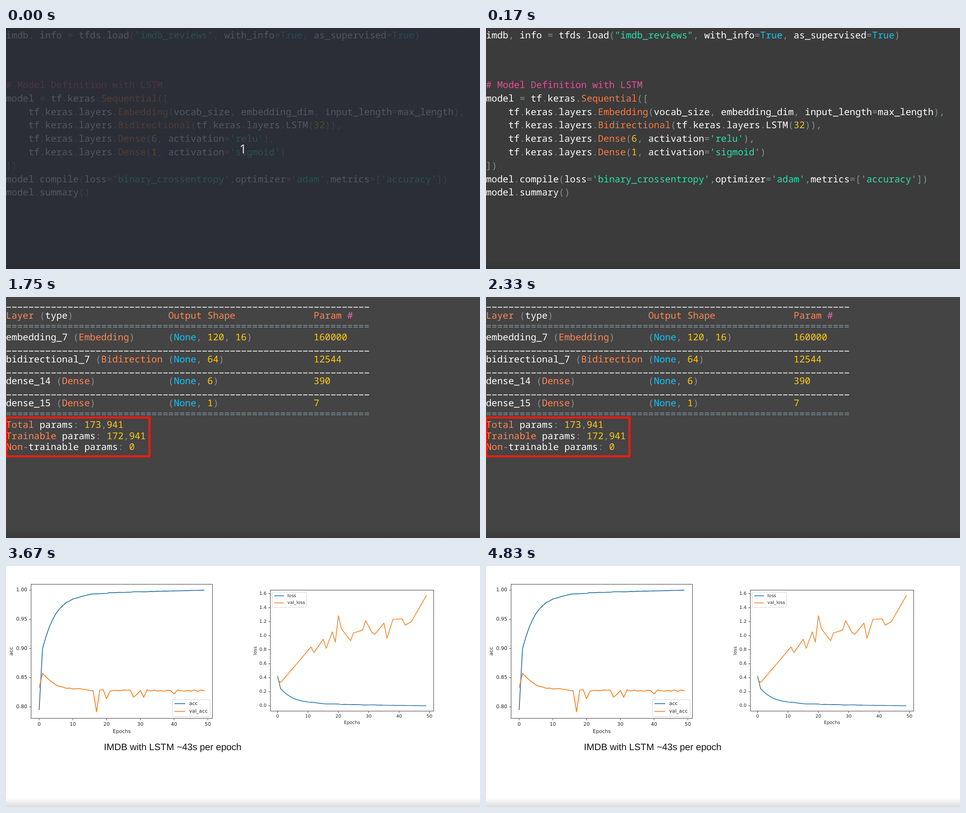
Recreate the animation shown at these times as an HTML page with a canvas. Size 1048 by 534 pixels, loop 5.33 s.

```html
<!DOCTYPE html>
<html lang="en">
<head>
<meta charset="utf-8">
<title>LSTM model, summary and training curves</title>
<style>
  html, body { margin: 0; width: 100%; height: 100%; overflow: hidden; background: #3b3b3b; }
  canvas { display: block; width: 1048px; height: 534px; }
</style>
</head>
<body>
<canvas id="stage" width="1048" height="534"></canvas>
<script>
const W = 1048, H = 534, LOOP = 5330, EPOCHS = 50;
const ctx = document.getElementById('stage').getContext('2d');
const PITCH = 12.37;
const MONO = `500 ${PITCH / 0.6}px "Roboto Mono", "Noto Sans Mono", monospace`;
const BLUE = '#3079ae', ORANGE = '#f58426', INK = '#262626', FRAME = '#484848';

const CODE_COLORS = { plain: '#ffffff', punct: '#84908f', string: '#2be0aa', comment: '#e94c9b',
  name: '#f07c48', number: '#f4c326', keyword: '#1cc3e8' };
const TABLE_COLORS = { plain: '#ffffff', punct: '#82929c', string: '#2be0aa', comment: '#f768ae',
  name: '#ff8652', number: '#ffcb0c', keyword: '#10c6f6' };

const TOKENS = [
  ['comment', /^#.*/],
  ['string', /^(["']).*?\1/],
  ['keyword', /^(True|None)\b/],
  ['name', /^(Sequential|Embedding|Bidirectional|Bidirection|Dense|Layer|Output|Shape|Param|Total|Trainable|Non)\b/],
  ['number', /^\d+\b/],
  ['plain', /^\w+/],
  ['plain', /^\s+/],
  ['punct', /^[^\w\s"'#]+/]
];

const CODE = [
  '# Model Definition with LSTM',
  'model = tf.keras.Sequential([',
  '    tf.keras.layers.Embedding(vocab_size, embedding_dim, input_length=max_length),',
  '    tf.keras.layers.Bidirectional(tf.keras.layers.LSTM(32)),',
  "    tf.keras.layers.Dense(6, activation='relu'),",
  "    tf.keras.layers.Dense(1, activation='sigmoid')",
  '])',
  "model.compile(loss='binary_crossentropy',optimizer='adam',metrics=['accuracy'])",
  'model.summary()'
];

const RULE = '='.repeat(65);
const tableRow = (a, b, c) => a.padEnd(29) + b.padEnd(26) + c;
const TABLE = [
  '_',
  tableRow('Layer (type)', 'Output Shape', 'Param #'),
  RULE,
  tableRow('embedding_7 (Embedding)', '(None, 120, 16)', '160000'),
  '_',
  tableRow('bidirectional_7 (Bidirection', '(None, 64)', '12544'),
  '_',
  tableRow('dense_14 (Dense)', '(None, 6)', '390'),
  '_',
  tableRow('dense_15 (Dense)', '(None, 1)', '7'),
  RULE,
  'Total params: 173,941',
  'Trainable params: 172,941',
  'Non-trainable params: 0'
];

// Repeatable noise in -1..1.
function jitter(n) {
  const s = Math.sin(n * 127.1 + 3.7) * 43758.5453;
  return 2 * (s - Math.floor(s)) - 1;
}

const decay = (n, span) => Math.exp(-n / span);
const remaining = n => 1 - n / (EPOCHS - 1);

// Training starts with a jump, falls off quickly, then closes in on its limit.
const acc = n => 1 - 0.12 * decay(n, 4) - 0.079 * decay(n, 0.1)
  - remaining(n) * (0.007 + 0.0009 * jitter(n));
const loss = n => 0.257 * decay(n, 4.6) + 0.138 * decay(n, 0.33)
  + remaining(n) * (0.032 + 0.006 * jitter(n));

const ACC_DIPS = { 0: 0.032, 17: 0.037, 20: 0.0155, 28: 0.01, 29: 0.006, 31: 0.0125, 40: 0.006 };
const valAcc = n => 0.828 + 0.0293 * decay(n - 1, 4) - (ACC_DIPS[n] || 0) + 0.0013 * jitter(n);

const LOSS_TURNS = [[0, 0.38], [1, 0.33], [11, 0.84], [12, 0.76], [15, 0.95], [16, 0.82], [18, 1.055],
  [19, 0.91], [20, 1.285], [21, 1.1], [24, 0.93], [25, 1.04], [28, 1.08], [29, 1.215], [31, 1.05],
  [32, 1.02], [35, 1.18], [36, 0.965], [38, 1.235], [41, 1.24], [42, 1.15], [44, 1.2], [49, 1.575]];
function valLoss(n) {
  const i = Math.max(1, LOSS_TURNS.findIndex(([e]) => e >= n));
  const [e0, v0] = LOSS_TURNS[i - 1], [e1, v1] = LOSS_TURNS[i];
  return v0 + (v1 - v0) * (n - e0) / (e1 - e0);
}

const CHARTS = [
  { box: [55, 40, 402, 298], range: [0.7905, 1], ticks: [0.8, 0.05, 5, 2], yLabelX: 12, legend: [368, 296],
    series: [['acc', BLUE, acc], ['val_acc', ORANGE, valAcc]] },
  { box: [584, 53, 362, 269], range: [0, 1.575], ticks: [0, 0.2, 9, 1], yLabelX: 551, legend: [589, 58],
    series: [['loss', BLUE, loss], ['val_loss', ORANGE, valLoss]] }
];

function fill(color, x = 0, y = 0, w = W, h = H) {
  ctx.fillStyle = color;
  ctx.fillRect(x, y, w, h);
}

function background(color, edge) {
  const g = ctx.createLinearGradient(0, 514, 0, H);
  g.addColorStop(0, color);
  g.addColorStop(1, edge);
  fill(g);
}

function text(str, x, y, font, color, align = 'left', baseline = 'alphabetic') {
  ctx.font = font;
  ctx.fillStyle = color;
  ctx.textAlign = align;
  ctx.textBaseline = baseline;
  ctx.fillText(str, x, y);
}

function line(points, color, width) {
  ctx.beginPath();
  points.forEach(([x, y]) => ctx.lineTo(x, y));
  ctx.strokeStyle = color;
  ctx.lineWidth = width;
  ctx.lineJoin = 'round';
  ctx.stroke();
}

function outline(x, y, w, h, color, width) {
  ctx.strokeStyle = color;
  ctx.lineWidth = width;
  ctx.lineJoin = 'miter';
  ctx.strokeRect(x, y, w, h);
}

function codeLine(src, y, colors) {
  let col = 0;
  while (col < src.length) {
    const rest = src.slice(col);
    const [kind, pattern] = TOKENS.find(([, re]) => re.test(rest));
    const token = rest.match(pattern)[0];
    text(token, col * PITCH, y, MONO, colors[kind]);
    col += token.length;
  }
}

function drawCode() {
  background('#3b3b3b', '#343434');
  codeLine('imdb, info = tfds.load("imdb_reviews", with_info=True, as_supervised=True)', 23, CODE_COLORS);
  CODE.forEach((src, i) => codeLine(src, 133 + i * 29.8, CODE_COLORS));
}

function drawCountdown(alpha) {
  ctx.globalAlpha = alpha;
  background('#272b35', '#282a2e');
  text('1', 524, 278, '28px "Noto Sans", "Open Sans", sans-serif', '#ffffff', 'center');
  ctx.globalAlpha = 1;
}

function drawSummary() {
  background('#444444', '#3a3a3a');
  TABLE.forEach((src, i) => {
    const y = 23.3 + i * 24.27;
    if (src === '_') {
      ctx.setLineDash([9.8, PITCH - 9.8]);
      line([[1.3, y - 0.6], [803, y - 0.6]], '#f4f4f4', 1.8);
      ctx.setLineDash([]);
    } else {
      codeLine(src, y, TABLE_COLORS);
    }
  });
  outline(0.5, 267, 316.7, 86, '#fb1b10', 4.5);
}

function drawChart({ box: [left, top, width, height], range: [low, high], ticks, yLabelX, legend, series }) {
  const bottom = top + height;
  const em = width / 36.4;
  const font = `${em}px "DejaVu Sans", sans-serif`;
  const stroke = em * 0.17;
  // The data keeps a margin of 1/22 of the box on every side.
  const xAt = n => left + width * (1 / 22 + n / (EPOCHS - 1) / 1.1);
  const yAt = v => bottom - height * (1 / 22 + (v - low) / (high - low) / 1.1);

  for (const [, color, value] of series)
    line(Array.from({ length: EPOCHS }, (_, n) => [xAt(n), yAt(value(n))]), color, stroke);

  outline(left + 0.5, top + 0.5, width - 1, height - 1, FRAME, 1.1);

  for (let n = 0; n <= EPOCHS; n += 10) {
    line([[xAt(n), bottom], [xAt(n), bottom + 4]], FRAME, 1);
    text(n, xAt(n), bottom + em * 1.18, font, INK, 'center', 'middle');
  }
  const [first, gap, count, digits] = ticks;
  for (let i = 0; i < count; i++) {
    const v = first + i * gap;
    line([[left - 4, yAt(v)], [left, yAt(v)]], FRAME, 1);
    text(v.toFixed(digits), left - 8, yAt(v), font, INK, 'right', 'middle');
  }
  text('Epochs', left + width / 2, bottom + em * 2.6, font, INK, 'center', 'middle');

  ctx.save();
  ctx.translate(yLabelX, top + height / 2);
  ctx.rotate(-Math.PI / 2);
  text(series[0][0], 0, 0, font, INK, 'center', 'middle');
  ctx.restore();

  const [lx, ly] = legend;
  ctx.beginPath();
  ctx.roundRect(lx, ly, em * 7.55, em * 3.4, 2);
  ctx.fillStyle = '#ffffff';
  ctx.fill();
  ctx.strokeStyle = '#d2d2d2';
  ctx.lineWidth = 1;
  ctx.stroke();
  series.forEach(([label, color], i) => {
    const y = ly + em * (0.82 + i * 1.56);
    line([[lx + em * 0.4, y], [lx + em * 2.55, y]], color, stroke);
    text(label, lx + em * 3.35, y, font, INK, 'left', 'middle');
  });
}

function drawPlots() {
  background('#ffffff', '#dcdcdc');
  CHARTS.forEach(drawChart);
  text('IMDB with LSTM ~43s per epoch', 216.5, 408, '20.7px "Liberation Sans", Arial, sans-serif', '#111111');
}

function render(now) {
  const t = now % LOOP;
  ctx.textRendering = 'geometricPrecision';
  if (t < 1500) {
    drawCode();
    if (t < 170) drawCountdown(t < 80 ? 0.8 : 0.4);
  } else if (t < 3080) {
    drawSummary();
  } else {
    drawPlots();
  }
}

const start = performance.now();
function frame() {
  render(performance.now() - start);
  requestAnimationFrame(frame);
}
frame();
</script>
</body>
</html>
```
